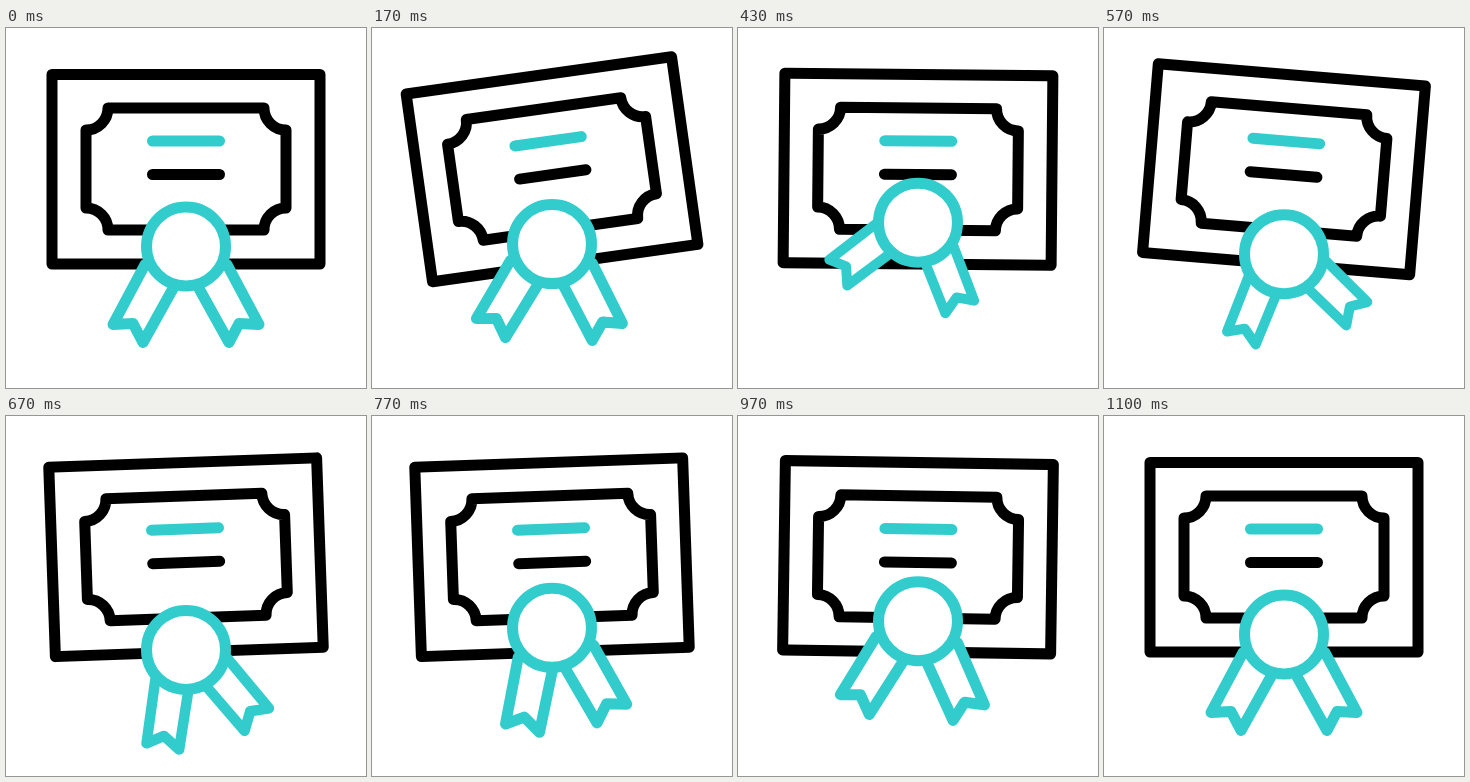
An HTML page for the animation above (1.67 s loop, 360 by 360 pixels).

```html
<!DOCTYPE html>
<html lang="en">
<head>
<meta charset="utf-8">
<title>Certificate</title>
<style>
  html, body { margin: 0; height: 100%; overflow: hidden; background: #fff; }
  svg { display: block; width: 100vw; height: 100vh; }
  path, circle {
    fill: #fff; stroke: #000; stroke-width: 11;
    stroke-linecap: round; stroke-linejoin: round;
  }
  .teal { stroke: #33cccc; }
</style>
</head>
<body>
<svg viewBox="0 0 360 360">
  <g id="sheet">
    <path d="M46 46.5H314V236H46Z"/>
    <path d="M102 80H258A22 22 0 0 0 280 102V180A22 22 0 0 0 258 202H102A22 22 0 0 0 80 180V102A22 22 0 0 0 102 80Z"/>
    <path class="teal" d="M146.5 113H213.5"/>
    <path d="M146.5 146.5H213.5"/>
  </g>
  <!-- The medal is drawn around its own centre -->
  <g id="medal">
    <path id="left" class="teal" d="M-41 18L-73 78L-53 77L-43 96L-13 42"/>
    <path id="right" class="teal" d="M41 18L73 78L53 77L43 96L13 42"/>
    <circle class="teal" r="39.5"/>
  </g>
</svg>
<script>
const LOOP = 1670, FPS = 30, END = 33;
const $ = id => document.getElementById(id);

// Keys are [step, value]; the value eases in and out between them.
const lift = [[4, 0], [10, -35.5], [19.5, 16], [25.5, -20], [32, -8]];
const swingLeft = [[4, 0], [10, 34.6], [20.5, -20.5], [32, 8]];
const swingRight = [[4, 0], [10, 22.8], [17, -17], [26, 4], [31, 5]];
const size = [[4, 1], [10, 0.9], [17, 0.9], [23, 1]];

function ease(keys, n) {
  const i = keys.findIndex(k => k[0] > n);
  if (i === 0) return keys[0][1];
  if (i < 0) return keys[keys.length - 1][1];
  const [n0, v0] = keys[i - 1], [n1, v1] = keys[i];
  return v0 + (v1 - v0) * (1 - Math.cos(Math.PI * (n - n0) / (n1 - n0))) / 2;
}

// Tilt steadily, snap back, then ring out like a spring.
function tilt(n) {
  const peak = 10, back = 12.9;
  if (n <= peak) return -1.6 * n;
  if (n <= back) return -16 * (back - n) / (back - peak);
  const x = n - back;
  return 10.3 * Math.exp(-0.145 * x) * Math.sin(Math.PI * x / 6);
}

function draw(now) {
  let n = Math.floor((now % LOOP) * FPS / 1000 + 0.15);
  if (n >= END) n = 0;
  const s = ease(size, n);
  const move = (id, value) => $(id).setAttribute("transform", value);
  move("sheet", `rotate(${tilt(n)} 180 141)`);
  move("medal", `translate(180 ${218.5 + ease(lift, n)})`);
  move("left", `rotate(${ease(swingLeft, n)}) scale(${s})`);
  move("right", `rotate(${ease(swingRight, n)}) scale(${s})`);
}

const start = performance.now();
function tick() {
  draw(performance.now() - start);
  requestAnimationFrame(tick);
}
tick();
</script>
</body>
</html>
```
